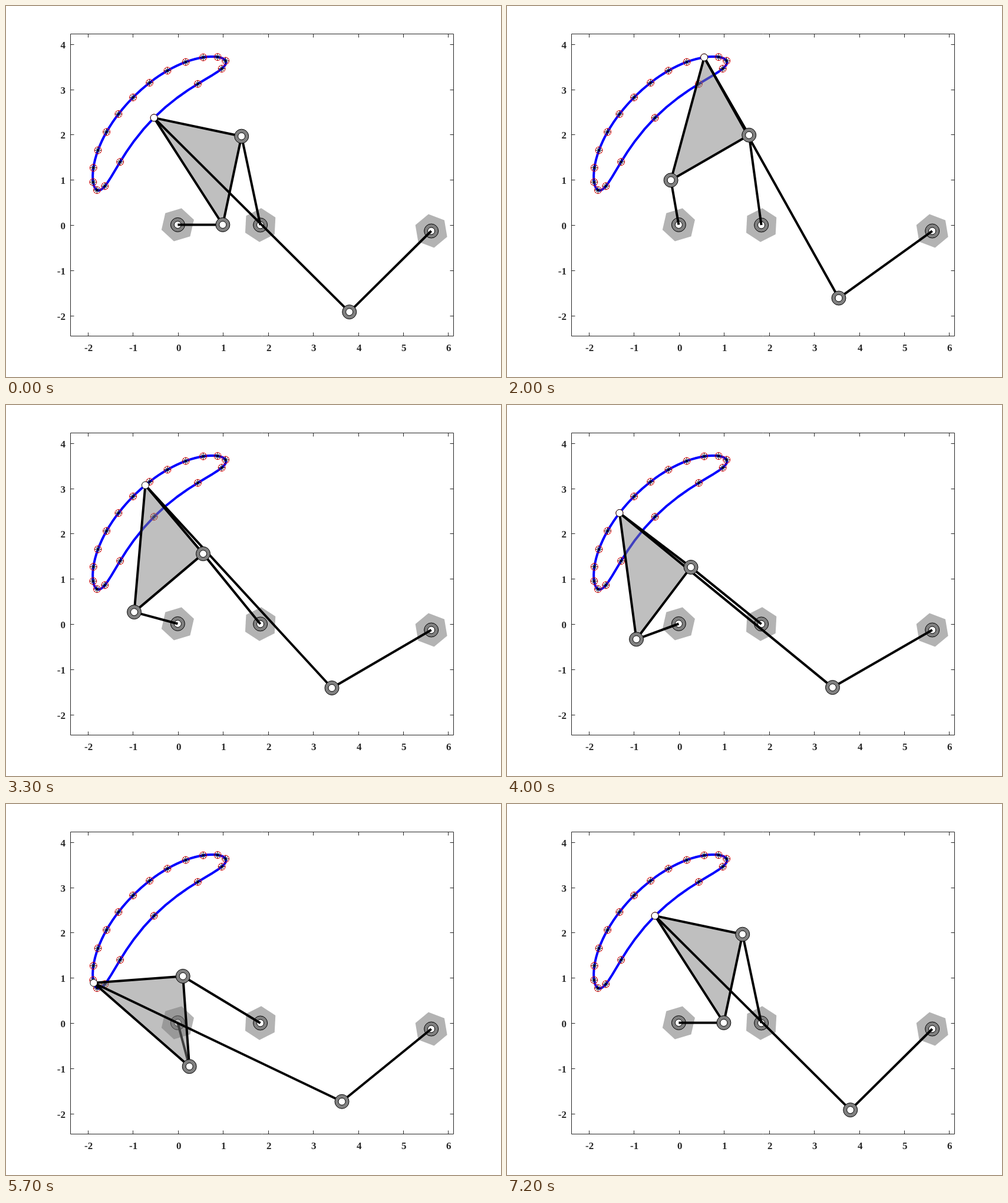
Write an HTML page with a canvas that moves like this. It is 840x630 px and loops after 7.3 s.

```html
<!DOCTYPE html>
<html lang="en">
<head>
<meta charset="utf-8">
<title>Six-bar linkage</title>
<style>
html, body { margin: 0; width: 100%; height: 100%; overflow: hidden; background: #fff; }
canvas { display: block; }
</style>
</head>
<body>
<canvas id="stage" width="840" height="630"></canvas>
<script>
const ctx = document.getElementById('stage').getContext('2d');
const STEP_MS = 100, STEPS = 73, DEG = Math.PI / 180;

// Linkage geometry in plot units; the crank pivot is the origin.
const A = [0, 0], D = [1.834, -0.006], F = [5.628, -0.137];
const CRANK = 1, COUPLER = 2, ROCKER = 2.006, ARM = 2.814, ARM_ANGLE = 44.88 * DEG;
const ROD = 6.101, LINK = 2.551;

const toPx = ([x, y]) => [291.4 + 76.45 * x, 371.5 - 76.85 * y];

// Intersection of two circles, left (side 1) or right (side -1) of the line p -> q.
function meet(p, rp, q, rq, side) {
  const dx = q[0] - p[0], dy = q[1] - p[1], d = Math.hypot(dx, dy);
  const along = (d * d + rp * rp - rq * rq) / (2 * d);
  const off = side * Math.sqrt(rp * rp - along * along);
  return [p[0] + (along * dx - off * dy) / d, p[1] + (along * dy + off * dx) / d];
}

function solve(degrees) {
  const a = degrees * DEG;
  const B = [CRANK * Math.cos(a), CRANK * Math.sin(a)];
  const C = meet(B, COUPLER, D, ROCKER, 1);
  const tilt = Math.atan2(C[1] - B[1], C[0] - B[0]) + ARM_ANGLE;
  const P = [B[0] + ARM * Math.cos(tilt), B[1] + ARM * Math.sin(tilt)];
  const E = meet(P, ROD, F, LINK, -1);
  return { B, C, P, E };
}

function trace(points) {
  ctx.beginPath();
  points.forEach(p => ctx.lineTo(...toPx(p)));
}

function line(...points) {
  trace(points);
  ctx.strokeStyle = '#000';
  ctx.lineWidth = 4;
  ctx.stroke();
}

function disc(p, radius, fill, stroke = '#000') {
  ctx.beginPath();
  ctx.arc(...toPx(p), radius, 0, 2 * Math.PI);
  if (fill) {
    ctx.fillStyle = fill;
    ctx.fill();
  }
  ctx.strokeStyle = stroke;
  ctx.lineWidth = 1;
  ctx.stroke();
}

function joint(p) {
  disc(p, 12, '#808080');
  disc(p, 6, '#fff');
}

function hexagon(p, turn) {
  const [x, y] = toPx(p);
  ctx.beginPath();
  for (let i = 0; i < 6; i++) {
    const a = (turn + 60 * i) * DEG;
    ctx.lineTo(x + 28.8 * Math.cos(a), y + 28.8 * Math.sin(a));
  }
  ctx.fillStyle = '#b3b3b3';
  ctx.fill();
}

function marker(p) {
  disc(p, 6, null, '#f00');
  const [x, y] = toPx(p);
  ctx.beginPath();
  for (let i = 0; i < 4; i++) {
    const r = i % 2 ? 5.5 : 6;
    const dx = r * Math.cos(i * 45 * DEG), dy = r * Math.sin(i * 45 * DEG);
    ctx.moveTo(x - dx, y - dy);
    ctx.lineTo(x + dx, y + dy);
  }
  ctx.strokeStyle = '#000';
  ctx.stroke();
}

function axes() {
  const left = 109.5, right = 759.5, top = 47.5, bottom = 560.5, tick = 6;
  ctx.strokeStyle = ctx.fillStyle = '#262626';
  ctx.lineWidth = 1;
  ctx.font = 'bold 17px "Liberation Serif", "Times New Roman", serif';
  ctx.beginPath();
  ctx.rect(left, top, right - left, bottom - top);
  ctx.textAlign = 'center';
  for (let v = -2; v <= 6; v++) {
    const x = Math.floor(292.4 + 76.4 * v) + 0.5;
    ctx.moveTo(x, bottom);
    ctx.lineTo(x, bottom - tick);
    ctx.moveTo(x, top);
    ctx.lineTo(x, top + tick);
    ctx.fillText(v, x + 0.7, 586);
  }
  ctx.textAlign = 'right';
  for (let v = -2; v <= 4; v++) {
    const y = Math.floor(372.5 - 76.8 * v) + 0.5;
    ctx.moveTo(left, y);
    ctx.lineTo(left + tick, y);
    ctx.moveTo(right, y);
    ctx.lineTo(right - tick, y);
    ctx.fillText(v, 101, y + 6);
  }
  ctx.stroke();
}

const path = Array.from({ length: 73 }, (_, i) => solve(5 * i).P);
const targets = path.filter((_, i) => i % 4 === 0 && i < 72);

function draw(step) {
  const { B, C, P, E } = solve(5 * step);
  ctx.fillStyle = '#fff';
  ctx.fillRect(0, 0, 840, 630);
  axes();

  ctx.lineJoin = 'round';
  trace(path);
  ctx.strokeStyle = '#00f';
  ctx.lineWidth = 4;
  ctx.stroke();
  targets.forEach(marker);

  [[A, 43], [D, 33], [F, 20.5]].forEach(([p, turn]) => {
    hexagon(p, turn);
    joint(p);
  });
  line(A, B);
  line(C, D);
  line(E, F);

  trace([B, C, P]);
  ctx.fillStyle = 'rgba(128, 128, 128, 0.5)';
  ctx.fill();
  line(B, C, P, B);
  line(P, E);

  [B, C, E].forEach(joint);
  disc(P, 6, '#fff');
}

function tick() {
  draw(Math.floor(performance.now() / STEP_MS) % STEPS);
  requestAnimationFrame(tick);
}
tick();
</script>
</body>
</html>
```
